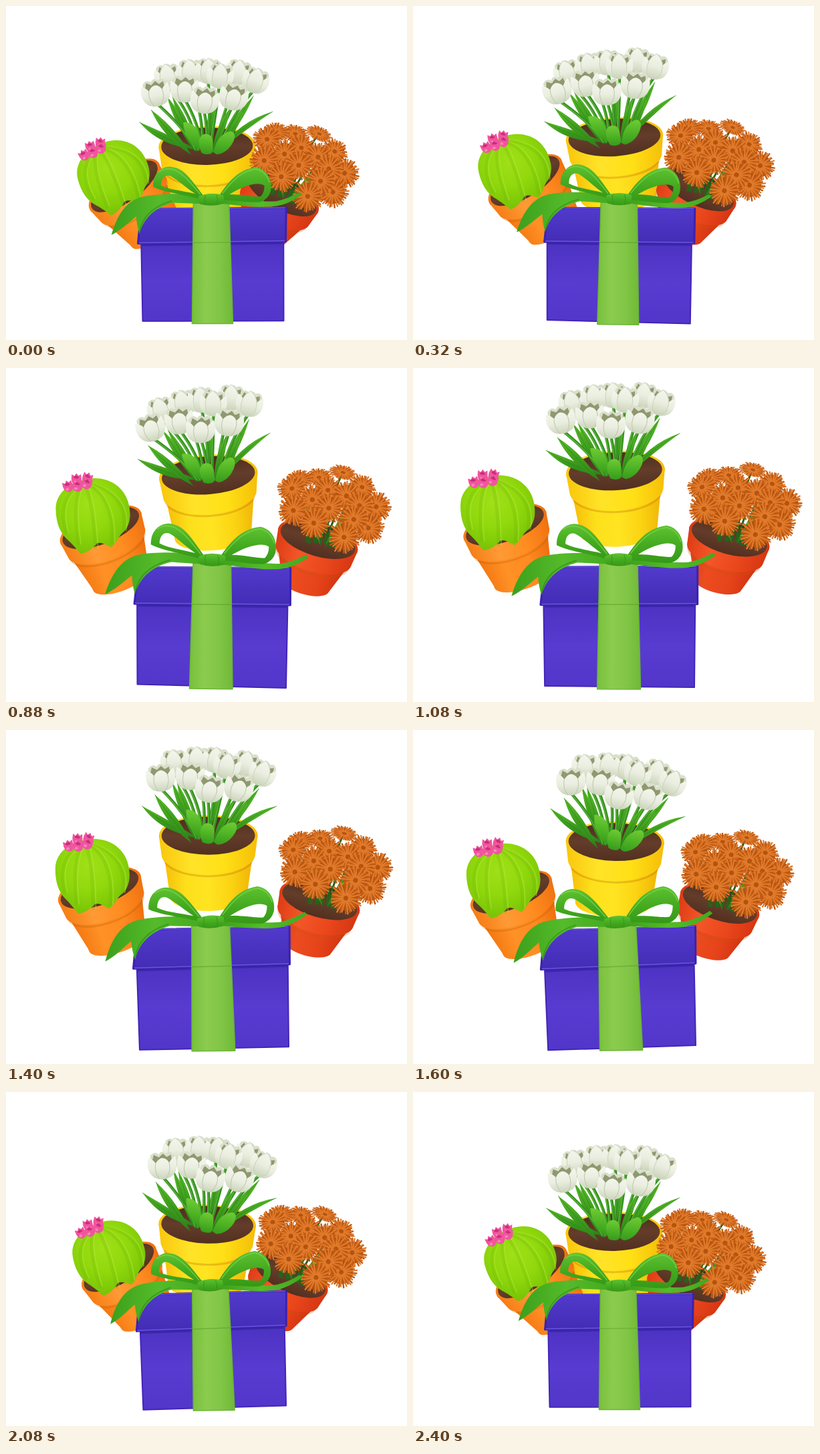
Recreate the animation shown at these times as an HTML page. Size 600 by 500 pixels, loop 3.8 s.

```html
<!DOCTYPE html>
<html lang="en">
<head>
<meta charset="utf-8">
<title>Potted plants and gift box</title>
<style>
html, body { margin: 0; width: 100%; height: 100%; overflow: hidden; background: #fff; }
svg { display: block; width: 100vw; height: 100vh; }
</style>
</head>
<body>
<svg id="stage" viewBox="0 0 600 500"></svg>
<script>
const LOOP = 3800, STEP = 40, END = 2400;

const path = (d, fill, extra = '') => `<path d="${d}" fill="${fill}" ${extra}/>`;
const line = (d, color, w, extra = '') =>
  `<path d="${d}" fill="none" stroke="${color}" stroke-width="${w}" stroke-linecap="round" ${extra}/>`;
const ellipse = (x, y, rx, ry, fill) => `<ellipse cx="${x}" cy="${y}" rx="${rx}" ry="${ry}" fill="${fill}"/>`;
const at = (x, y, turn, size, body) =>
  `<g transform="translate(${x} ${y}) rotate(${turn}) scale(${size})">${body}</g>`;
const stops = colors => colors.map((c, i) =>
  `<stop offset="${i / (colors.length - 1)}" stop-color="${c}"/>`).join('');
const gradient = (id, colors, down) =>
  `<linearGradient id="${id}" x2="${down ? 0 : 1}" y2="${down ? 1 : 0}">${stops(colors)}</linearGradient>`;
const glow = (id, colors) =>
  `<radialGradient id="${id}" cx=".45" cy=".35" r=".7">${stops(colors)}</radialGradient>`;

const defs = `<defs>
${gradient('yellow', ['#f6bd08', '#fde01c', '#ffe421', '#fbd413', '#f0b406'])}
${gradient('yellowRim', ['#f9c60c', '#ffe328', '#ffe016', '#f5bd08'])}
${gradient('orange', ['#f2740f', '#ff9126', '#ff8a20', '#ea6a0c'])}
${gradient('orangeRim', ['#f57c14', '#ff9a35', '#ff8c20', '#ef7110'])}
${gradient('red', ['#d93a15', '#ec4c20', '#e6431a', '#cf3110'])}
${gradient('redRim', ['#dc3b14', '#f35628', '#ea471c', '#d53612'])}
${gradient('soil', ['#4b2b1c', '#643d2a', '#512f20'], 1)}
${gradient('petal', ['#f4f6ec', '#eaeee0', '#cbd4bb'], 1)}
${gradient('leaf', ['#5cbd2e', '#3d9d1c', '#2c861a'], 1)}
${gradient('broad', ['#6ecb34', '#50b425', '#369a1d'], 1)}
${glow('cactusSkin', ['#a0e018', '#90d80c', '#74c006'])}
${gradient('bowSkin', ['#5fc232', '#45ab20', '#359817'], 1)}
${gradient('tailSkin', ['#3c9f1b', '#55bb2a', '#43a820'])}
${gradient('lidSkin', ['#523bcc', '#4a33c0', '#432cb5'], 1)}
${gradient('bodySkin', ['#4c32c2', '#583bd0', '#5236ca'], 1)}
${gradient('ribbonSkin', ['#78c03c', '#8bcb4e', '#82c646', '#70b938'])}
</defs>`;

function pot(x, y, tilt, rx, ry, rim, h, base, baseRy, skin) {
  const edge = rx * .95, neck = rx * .9, k = ry / rx;
  return at(x, y, tilt, 1,
    path(`M${-neck} ${rim - 2}L${-base} ${h - 4}Q${-base} ${h} ${-base + 1} ${h + 3}A${base} ${baseRy} 0 0 0 ${base - 1} ${h + 3}L${neck} ${rim - 2}Z`, `url(#${skin})`) +
    line(`M${-neck} ${rim + 3}A${neck} ${neck * k} 0 0 0 ${neck} ${rim + 3}`, '#b85a00', 3, 'opacity=".28"') +
    path(`M${-rx} 0L${-edge} ${rim - 2}A${edge} ${edge * k} 0 0 0 ${edge} ${rim - 2}L${rx} 0Z`, `url(#${skin}Rim)`) +
    ellipse(0, 0, rx, ry, `url(#${skin}Rim)`) +
    ellipse(0, 0, rx - 4, ry - 2.5, 'url(#soil)'));
}

function leaf(x0, y0, x1, y1, w, bend = 0) {
  const dx = x1 - x0, dy = y1 - y0, n = Math.hypot(dx, dy);
  const ctrl = b => `${x0 + dx * .55 - dy / n * b} ${y0 + dy * .55 + dx / n * b}`;
  return path(`M${x0} ${y0}Q${ctrl(bend - w)} ${x1} ${y1}Q${ctrl(bend + w)} ${x0} ${y0}Z`, 'url(#leaf)') +
    line(`M${x0} ${y0}Q${ctrl(bend)} ${x1} ${y1}`, '#2b7d17', 1, 'opacity=".5"');
}

function tulip(x, y, isBud) {
  const front = isBud
    ? path('M-2 -19Q15 -10 11 12Q0 25 -10 13Q-16 -8 -2 -19Z', 'url(#petal)', 'stroke="#c9d1b8" stroke-width=".9"')
    : line('M-9 -3Q-12 8 -5 19M10 -3Q13 8 5 19', '#c0c9ad', 1);
  return at(x, y, (x - 293) / 5, isBud ? 1 : 1.07,
    path('M-17 2L-16 -14Q-9 -21 -4 -15Q0 -22 6 -16Q12 -21 17 -13L18 2Z', '#d9dfca') +
    path('M-15 -3L-11 -15L-4 -11L2 -16L7 -11L13 -14L15 -2L0 4Z', '#8f9870') +
    path('M-19 -11Q-13 -9 -9 -3Q-4 -10 1 -10Q7 -9 10 -3Q14 -9 19 -12Q25 8 12 17Q0 23 -12 17Q-24 8 -19 -11Z', 'url(#petal)') + front);
}

function tulipPlant() {
  const buds = [[234, 54], [267, 44], [295, 40], [340, 38], [313, 46], [367, 48]];
  const blooms = [[218, 80], [261, 70], [336, 75], [293, 84]];
  const stem = ([x, y]) => {
    const foot = 303 + (x - 293) * .22;
    const curve = shift => `M${foot - shift} 160Q${foot - shift + (x - 293) * .25} ${y + 50} ${x - shift} ${y + 14}`;
    return line(curve(0), '#369320', 4.5) + line(curve(1), '#5fb83a', 1.3);
  };
  return leaf(288, 160, 198, 127, 11, -9) + leaf(318, 162, 397, 93, 8, -10) +
    leaf(285, 163, 236, 84, 10) + leaf(318, 160, 366, 72, 10) + leaf(300, 158, 308, 82, 9) +
    [...buds, ...blooms].map(stem).join('') +
    leaf(280, 169, 214, 107, 12, -2) + leaf(289, 163, 244, 84, 10) +
    leaf(312, 160, 331, 96, 10) + leaf(320, 160, 353, 92, 9, 4) +
    path('M292 160C278 156 266 138 264 121C277 119 292 126 293 158Z', 'url(#broad)') +
    path('M296 165C287 150 289 139 298 136C308 134 314 142 311 164Q304 168 296 165Z', 'url(#broad)') +
    path('M314 163C314 146 323 131 337 128Q346 130 342 143Q335 161 319 165Z', 'url(#broad)') +
    buds.map(([x, y]) => tulip(x, y, true)).join('') + blooms.map(([x, y]) => tulip(x, y)).join('');
}

function cactusPlant() {
  let ribs = '';
  for (let i = 0; i < 5; i++) {
    const a = (155 - i * 32) * Math.PI / 180, x = 128 + 48 * Math.cos(a), y = 222 + 42 * Math.sin(a);
    const d = `M${108 + i * 4} ${170 - i}Q${x + (i - 2) * 6} ${190} ${x} ${y}`;
    ribs += line(d, '#63ab05', 5, 'opacity=".2"') + line(d, '#b4ea3a', 2, 'opacity=".4" transform="translate(4 0)"');
  }
  const bloom = ([x, y]) => at(x, y, (x - 105) * 1.3, 1,
    path('M-7 -2L-6 -9L-2 -6L1 -10L4 -6L8 -8L8 2Q6 8 0 8Q-7 7 -7 -2Z', '#f0559f') +
    path('M-4 -4L0 -7L5 -3Q1 0 -4 -4Z', '#c92f78') + ellipse(-2, 3, 2.5, 2, '#ff82bc'));
  return path('M71 203C72 178 98 160 128 160C158 160 181 180 182 211C183 226 178 236 172 242C165 246 160 258 151 265C142 260 136 256 130 258C123 266 113 272 104 272C97 262 91 255 84 248C76 239 70 224 71 203Z', 'url(#cactusSkin)') +
    ribs + [[104, 161], [120, 160], [91, 171], [119, 168], [105, 171]].map(bloom).join('');
}

const noise = n => { const v = Math.sin(n * 127.1) * 43758.5; return v - Math.floor(v); };

// Heads farther back are smaller and seen more from the side
function daisy([x, y], i) {
  const r = 20 + (y - 150) / 25, flat = Math.min(1, .5 + (y - 150) / 70);
  const rays = ['', ''];
  for (let k = 0; k < 38; k++) {
    const a = k * Math.PI / 19 + noise(i + k) * .12, len = r * (.86 + .18 * noise(i * 40 + k));
    const tip = n => `${(Math.cos(a) * n).toFixed(1)} ${(Math.sin(a) * n).toFixed(1)}`;
    rays[k % 2] += `M${tip(3)}L${tip(len)}`;
  }
  return `<g transform="translate(${x} ${y}) rotate(${(x - 480) * .4}) scale(1 ${flat})">` +
    ellipse(0, 0, r * .78, r * .78, '#b04c0c') + line(rays[0], '#bf5a14', 2.5) +
    line(rays[1], '#e07a2a', 2.3) + ellipse(0, 0, 3.6, 3.6, '#b4530f') + '</g>';
}

function daisyPlant() {
  const heads = [[509, 152], [473, 160], [443, 165], [538, 173], [487, 179], [515, 187], [464, 194],
    [560, 202], [535, 201], [433, 178], [549, 234], [489, 206], [436, 211], [527, 222], [467, 229], [513, 249]];
  const stem = ([x, y]) =>
    line(`M${478 + (x - 490) * .35} 258Q${480 + (x - 480) * .5} ${y + 24} ${x} ${y}`, '#25641a', 3);
  return heads.map(stem).join('') + leaf(478, 262, 456, 200, 6) + leaf(485, 262, 527, 194, 7) +
    heads.map(daisy).join('');
}

function bowShape() {
  return path('M300 280C270 276 222 275 196 281C172 287 157 308 147 341C162 334 174 322 187 312Q188 328 192 340C198 318 214 299 246 291L302 294Z', 'url(#tailSkin)') +
    line('M192 338C196 314 212 297 244 288', '#2d8815', 2, 'opacity=".55"') +
    path('M318 281C350 285 382 293 412 291Q432 287 449 277L453 281Q432 296 412 299C382 302 348 296 318 293Z', 'url(#tailSkin)') +
    path('M297 283C276 255 265 234 241 233C223 234 214 250 215 265C235 275 262 277 294 287ZM282 277C260 272 242 270 228 263C228 251 235 245 243 248C256 255 268 268 282 277Z', 'url(#bowSkin)', 'fill-rule="evenodd"') +
    path('M319 283C333 262 350 239 380 236C400 240 406 260 403 275Q399 288 386 292C361 293 341 287 319 288ZM337 279C357 279 377 284 387 283Q393 277 393 266C383 258 358 266 337 279Z', 'url(#bowSkin)', 'fill-rule="evenodd"') +
    line('M225 241Q237 233 251 239C266 247 278 263 290 278M326 277C341 258 356 242 380 239Q396 243 401 260', '#7dd94d', 1.6, 'opacity=".7"') +
    path('M288 281Q307 274 327 280Q329 288 326 294Q307 299 290 294Q285 287 288 281Z', 'url(#bowSkin)') +
    line('M298 280Q296 287 298 293M316 280Q319 287 317 293', '#2f8c17', 1.2, 'opacity=".6"');
}

const stage = document.getElementById('stage');
stage.innerHTML = defs +
  `<g id="tulipPot">${pot(303, 154, -5, 74, 31, 30, 92, 58, 22, 'yellow')}</g>` +
  `<g id="tulips">${tulipPlant()}</g>` +
  `<g id="cactus">${pot(137, 235, -18, 65, 27, 26, 84, 45, 17, 'orange')}${cactusPlant()}</g>` +
  `<g id="daisies">${pot(474, 254, 15, 62, 27, 25, 70, 38, 15, 'red')}${daisyPlant()}</g>` +
  `<path id="box" fill="url(#bodySkin)" stroke="#4325b8" stroke-width="2" stroke-linejoin="round"/>
  <path id="shade" fill="none" stroke="#2b1a8c" stroke-width="4" opacity=".5"/>
  <path id="lid" fill="url(#lidSkin)" stroke="#3c22b0" stroke-width="3" stroke-linejoin="round"/>
  <path id="shine" fill="none" stroke="#6a55e0" stroke-width="1.5" stroke-linecap="round"/>
  <path id="ribbon" fill="url(#ribbonSkin)" stroke="#6ab534" stroke-width="1.5" stroke-linejoin="round"/>
  <path id="fold" fill="none" stroke="#559d27" stroke-width="1.5" opacity=".55"/>` +
  `<g id="bow">${bowShape()}</g>`;

const part = id => document.getElementById(id);
const setPath = (id, d) => part(id).setAttribute('d', d);

function place(id, px, py, x, y, turn, size) {
  part(id).setAttribute('transform',
    `translate(${x} ${y}) rotate(${turn}) scale(${size}) translate(${-px} ${-py})`);
}

// A nearly level edge: its two ends, given centre, half width and rise to the right
const edge = (x, y, half, tilt) => [[x - half, y - tilt / 2], [x + half, y + tilt / 2]];
const between = (a, b, inset = 0, dy = 0) => `M${a[0] + inset} ${a[1] + dy}L${b[0] - inset} ${b[1] + dy}`;
const panel = (top, bottom) => `M${[top[0], top[1], bottom[1], bottom[0]].map(p => p.join(' ')).join('L')}Z`;

function draw(t) {
  const p = t / END;
  const lift = Math.pow(Math.max(0, Math.sin(Math.PI * p * (1 + .05 * (1 - p)))), 1.7);
  const sway = Math.sin(2 * Math.PI * p);
  const rest = 1 - lift;

  const tulipX = 303 - 2 * rest, tulipY = 152 + 56 * rest;
  place('tulipPot', 303, 152, tulipX, tulipY, 4 - 3.5 * sway - lift, 1 - .02 * rest);
  place('tulips', 303, 152, tulipX, tulipY, 5.2 - 9 * sway, 1 - .01 * rest);
  place('cactus', 137, 235, 137 + 40 * rest, 235 + 35 * rest, -17 * rest - 1.5 * sway, 1 - .04 * rest);
  place('daisies', 474, 254, 474 - 61 * rest, 254 + 27 * rest, 13 * rest, 1 - .02 * rest);

  const bowX = 306.5 + 1.7 * sway, bowY = 289 - 3 * lift, bowSize = .935 + .065 * lift;
  place('bow', 307, 286, bowX, bowY, -.9 + 2.3 * sway, bowSize);

  const lidTop = edge(310.8 + 1.5 * sway, 303 - 6 * lift + 1.5 * sway, 108.5 + 6 * lift, -2.2 + 4.5 * sway);
  const lidTilt = -3 + 7 * sway;
  const lidFoot = edge(308 + sway, 354, 110.5 + 7 * lift, lidTilt);
  const boxTop = edge(308.8, 354, 106.5 + 7 * lift, lidTilt);
  const footX = 310 - 3 * sway, footY = 471.5 + 5.5 * lift;
  const boxFoot = edge(footX, footY, 105.5 + 6.5 * lift, -.5 + 8 * sway);
  setPath('box', panel(boxTop, boxFoot));
  setPath('shade', between(...boxTop, 1, 2));
  setPath('lid', panel(lidTop, lidFoot));
  setPath('shine', between(...lidTop, 2) + between(...lidFoot, 2, -1));

  const bandTop = edge(bowX + .5, bowY + 6, 28.5 * bowSize, 0);
  const bandFoot = edge(footX - 1, footY + 4, 30.5 + 2 * lift, sway);
  setPath('ribbon', panel(bandTop, bandFoot));
  const k = (354 - bowY - 6) / (footY - bowY - 2);
  const mix = (a, b) => a + (b - a) * k;
  setPath('fold', between(...edge(mix(bowX + .5, footX - 1), 354, mix(28.5 * bowSize, 30.5 + 2 * lift), lidTilt / 4)));
}

const start = performance.now();
function tick() {
  const t = (performance.now() - start) % LOOP;
  draw(Math.min(END, Math.floor(t / STEP) * STEP));
  requestAnimationFrame(tick);
}
tick();
</script>
</body>
</html>
```
